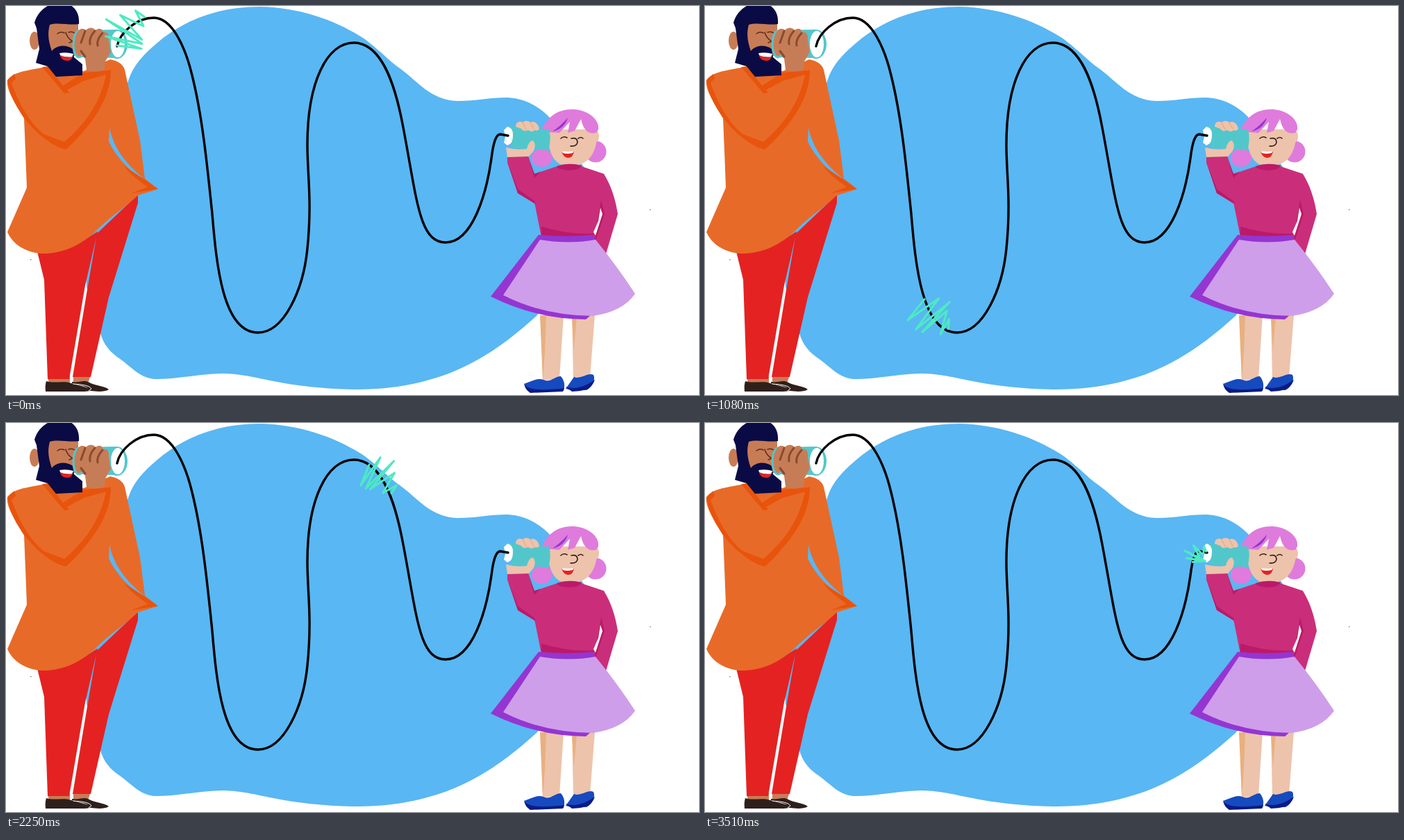
An HTML page for the animation above (3600 ms loop, 998 by 561 pixels).

```html
<!DOCTYPE html>
<html lang="en">
<head>
<meta charset="utf-8">
<title>Tin can telephone</title>
<style>
  html, body { margin: 0; width: 100%; height: 100%; overflow: hidden; background: #fff; }
  svg { display: block; width: 100%; height: 100%; }
  .line { fill: none; stroke-linecap: round; stroke-linejoin: round; }
</style>
</head>
<body>
<svg viewBox="0 0 998 561">
  <path fill="#59b7f3" d="M176 108C183 85 200 68 218 53C250 25 300 1 365 1C425 2 478 22 517 48C545 70 548 76 570 92C592 108 612 136 650 137C678 137 695 132 722 132C748 133 770 146 785 163L832 232L800 400L764 447C720 487 680 514 635 531C590 547 550 553 500 553C455 552 420 548 385 541C350 534 335 530 310 530C275 531 240 539 213 538C190 535 181 520 160 506C145 495 138 482 135 468L116 405L110 330Z"/>

  <g id="man">
    <path fill="#c87c56" d="M60 534H92V545H62ZM97 532H122L118 544H97Z"/>
    <path fill="#e42222" d="M44 350L55 395L60 538H91L114 403L132 325L112 338ZM131 328L118 403L96 535H122L148 420L190 284V272Z"/>
    <path fill="#2f1f1b" d="M58 541C70 545 84 539 97 545L123 552C125 555 118 556 110 556H57Q56 547 58 541ZM95 542C105 544 112 538 120 543C130 548 142 548 148 553C142 557 130 556 122 555C120 548 108 548 95 544Z"/>
    <path class="line" stroke="#fff" d="M97 545C110 546 120 547 123 552L119 555"/>
    <path fill="#e86a28" d="M62 87L35 92C20 95 8 98 2 107C0 120 12 138 26 162L28 210L30 262L2 326C10 344 28 355 50 357C80 358 108 346 132 322C155 300 172 290 190 273L219 264L200 249L193 194L171 92Q167 80 150 77L112 94Z"/>
    <path fill="#59b7f3" d="M149 175C154 202 170 226 200 250C178 240 157 215 148 195Z"/>
    <path fill="#e8540c" d="M198 249L219 264L180 270L204 261C190 251 178 242 170 231ZM2 107L12 98L14 105L8 111C18 140 35 170 55 185L84 196C110 174 137 142 145 94L151 92C151 130 130 162 98 196L86 207L76 204C45 188 20 160 6 125ZM52 88L61 87L82 115L112 96L148 93L148 98L112 108L88 121L91 125L84 126Z"/>
    <ellipse cx="41" cy="50" rx="7" ry="13" fill="#c87c56"/>
    <path fill="#c87c56" d="M58 22H104V72H60Z"/>
    <path fill="#0a0b44" d="M41 24C45 10 57 -2 70 -3H89C101 2 106 12 105 26C90 28 75 23 63 27C59 42 62 53 66 65C72 56 88 55 96 62L98 74L110 84V100L72 102L60 87L43 82L48 62L44 32Z"/>
    <path fill="#fff" d="M77 68Q87 66 97 69L95 74L79 73Z"/>
    <path fill="#e42222" d="M78 71Q87 75 96 73Q94 79 88 79Q79 78 78 71Z"/>
    <g class="line" stroke="#5d2d20" stroke-width="1.5">
      <path d="M74 40Q79 36 84 39M90 38Q95 36 99 39M86 38Q88 46 96 51L91 53"/>
    </g>
    <path fill="#52c7cb" d="M106 35L160 34V75L106 74Z"/>
    <ellipse cx="105" cy="55" rx="8" ry="19" fill="#c87c56" stroke="#52c7cb" stroke-width="3"/>
    <ellipse cx="160" cy="55" rx="15" ry="21" fill="#52c7cb"/>
    <ellipse cx="161" cy="55" rx="10" ry="19" fill="#fff"/>
    <path fill="#c67d57" d="M102 40C105 32 111 31 115 35C120 30 126 31 129 35C134 31 139 33 140 38C146 36 149 42 148 49L151 66L143 80L142 92Q128 97 116 92L114 76L106 67Z"/>
    <path class="line" stroke="#8a4a2e" stroke-width="3" d="M114 36L108 53M128 36Q119 46 121 55M139 39Q130 49 132 57M108 65L114 73"/>
  </g>

  <g id="girl">
    <g fill="#df7bdc"><circle cx="849" cy="210" r="15.5"/><ellipse cx="772" cy="219" rx="15" ry="13"/></g>
    <g fill="#edc3ab">
      <path d="M770 446H803L797 538L773 540ZM815 446H848L841 536L817 538Z"/>
      <path d="M779 178H851C853 212 838 231 812 231C790 231 781 215 779 178Z"/>
      <ellipse cx="849" cy="188" rx="5" ry="9"/>
    </g>
    <path fill="#e8b080" d="M769 446H778L776 500L773 540ZM815 447H822L818 495Z"/>
    <path fill="#164abf" d="M746 545C758 541 765 536 774 539C784 544 790 534 799 534C805 541 805 548 803 555L755 557ZM806 552L818 535C828 539 838 528 846 532C850 540 842 552 836 554H814Z"/>
    <path fill="#0b1a86" d="M746 544C750 556 780 554 804 551L802 556L755 558Q747 553 746 544ZM806 549C820 554 834 549 848 539C843 552 836 555 815 556Z"/>
    <path fill="#ca2e7a" d="M722 216L752 216L761 242L794 231H828L861 242C872 260 878 280 881 300L863 361L846 343V332L771 333L761 283L737 270L722 226Z"/>
    <path fill="#bb1a68" d="M793 231Q810 225 829 230Q826 237 810 237Q794 236 793 231ZM771 318Q810 330 846 328V336H771ZM722 224L737 264L761 281L763 286L737 270ZM754 225L761 242L770 239L761 248ZM857 280L862 300L847 345L849 327Z"/>
    <path fill="#fff" d="M856 291L859 300L849 331L846 326L853 310Z"/>
    <path fill="#9535d2" d="M767 330Q810 334 845 330L851 340L770 350L720 416L842 446L835 452Q765 452 698 419Z"/>
    <path fill="#cf9eea" d="M769 337Q810 344 849 337Q880 375 906 415Q888 441 845 447Q775 447 716 417Z"/>
    <path fill="#df7bdc" d="M771 181C778 160 795 148 818 149C841 151 855 165 853 178L850 183C840 185 832 181 828 163L819 180L809 183L812 167L797 183Z"/>
    <path fill="#9535d2" d="M809 161C806 172 799 178 787 181Q800 172 809 161Z"/>
    <path class="line" stroke="#35201e" stroke-width="1.6" d="M799 191Q803 187 808 190M824 191Q828 188 831 191M814 191Q823 189 823 197Q821 203 813 202"/>
    <path fill="#e42222" d="M800 209Q809 212 818 209Q817 219 809 219Q802 218 800 209Z"/>
    <path fill="#fff" d="M800 209Q809 211 818 209L816 212Q808 214 802 212Z"/>
    <path fill="#52c7cb" d="M725 172L750 177L782 178Q786 192 781 208L728 205Z"/>
    <path fill="#fff" d="M722 174Q731 176 730 187Q730 199 722 201L717 197L719 189L717 179Z"/>
    <path fill="#edc3ab" d="M734 174C734 167 740 165 744 168C748 164 754 166 755 168C761 165 767 170 768 177Q766 181 761 179Q758 183 752 179Q745 182 742 177ZM720 204Q735 208 750 206Q753 194 759 194Q764 200 760 209L753 217L722 218Z"/>
    <path class="line" stroke="#e8b080" stroke-width="1.5" d="M744 168L749 178M755 168L760 177"/>
  </g>

  <path id="cord" class="line" stroke="#000" stroke-width="3.4" d="M160 58C164 38 188 17 213 17C240 17 259 62 268 100C283 160 290 232 297 300C303 372 312 471 363 471C400 471 428 410 434 350C441 280 434 245 434 200C434 110 462 53 501 53C540 53 560 110 572 175C592 280 595 341 633 341C672 341 692 270 699 220C702 195 706 185 712 185L723 187"/>
  <path id="pulse" class="line" stroke="#4deac2" stroke-width="3"/>
  <path fill="#888" d="M927 293h1.5v1.5h-1.5zM35 365h1.5v1.5h-1.5z"/>
</svg>

<script>
const STEP = 90, LOOP = 3600;
const cord = document.getElementById("cord");
const pulse = document.getElementById("pulse");
const total = cord.getTotalLength();

// Scribble corners: distance along the cord, distance to its right.
const scribble = [[-28, 0], [-11, 34], [-22, -20], [2, 30], [-8, -32],
                  [8, 25], [5, -22], [24, 9], [22, -16], [30, -3]];

// Step, x, y, size
const keys = [
  [0, 178, 37, 1], [6, 279, 159, 1], [8, 293, 260, 1], [12, 325, 450, 1],
  [17, 437, 307, 1], [18, 436, 257, 1], [24, 503, 53, .92], [25, 543, 77, .9],
  [30, 585, 247, .86], [32, 599, 308, .8], [36, 681, 285, .68], [39, 708, 188, .5]
].map(([step, x, y, size]) => ({ step, size, at: nearestLength(x, y) }));

function nearestLength(x, y) {
  let best = 0, least = Infinity;
  for (let s = 0; s <= total; s++) {
    const p = cord.getPointAtLength(s), d = Math.hypot(p.x - x, p.y - y);
    if (d < least) { least = d; best = s; }
  }
  return best;
}

function offsetPoint(s, side) {
  s = Math.max(0, Math.min(total, s));
  const p = cord.getPointAtLength(s);
  const a = cord.getPointAtLength(Math.max(0, s - 3));
  const b = cord.getPointAtLength(Math.min(total, s + 3));
  const angle = Math.atan2(b.y - a.y, b.x - a.x);
  return [p.x - Math.sin(angle) * side, p.y + Math.cos(angle) * side];
}

function draw(now) {
  const step = Math.floor(now % LOOP / STEP);
  const i = Math.max(1, keys.findIndex(k => k.step >= step));
  const a = keys[i - 1], b = keys[i];
  const f = (step - a.step) / (b.step - a.step);
  const mix = name => a[name] + (b[name] - a[name]) * f;
  const at = mix("at"), size = mix("size");
  const points = scribble.map(([u, n]) => offsetPoint(at + u * size, n * size));
  pulse.setAttribute("d", "M" + points.map(p => p.map(v => v.toFixed(1))).join("L"));
  requestAnimationFrame(draw);
}

draw(0);
</script>
</body>
</html>
```
